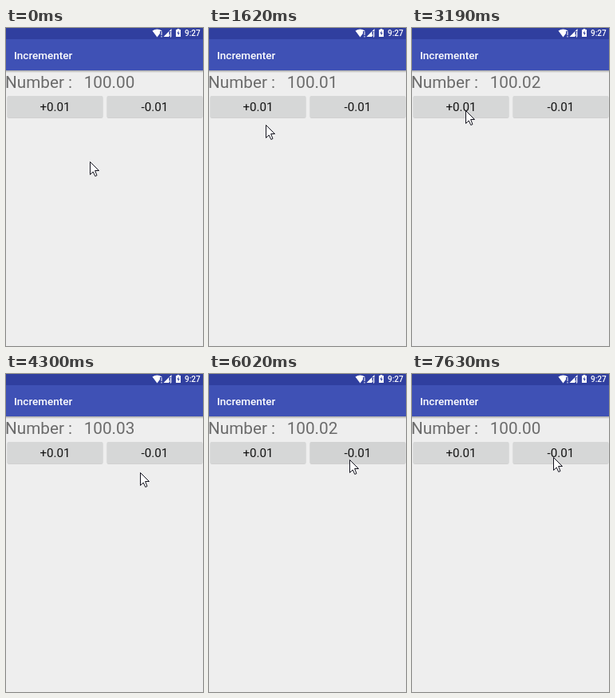
An HTML page that plays this animation: 247 px wide and 398 px high, repeating every 8000 ms.

```html
<!DOCTYPE html>
<html lang="en">
<head>
<meta charset="utf-8">
<title>Counter</title>
<style>
  html, body { margin: 0; width: 100%; height: 100%; overflow: hidden; background: #eee; }
  svg { display: block; width: 247px; height: 398px; font-family: Roboto, sans-serif; }
</style>
</head>
<body>
<svg viewBox="0 0 247 398">
  <defs>
    <linearGradient id="drop" x2="0" y2="1">
      <stop stop-color="#000" stop-opacity=".3"/>
      <stop offset="1" stop-color="#000" stop-opacity="0"/>
    </linearGradient>
    <g id="button">
      <rect y="1" width="120" height="27" rx="2" fill="#000" opacity=".12"/>
      <rect width="120" height="27" rx="1.5"/>
    </g>
  </defs>
  <rect width="247" height="398" fill="#eee"/>
  <rect y="53" width="247" height="3" fill="url(#drop)"/>
  <rect width="247" height="53" fill="#3f51b5"/>
  <rect width="247" height="14" fill="#303f9f"/>

  <g fill="#fff">
    <path d="M183.500 3.500Q189.500 -.5 195.500 3.500L189.500 11.500Z"/>
    <path d="M197.500 11L207.500 1V11Z"/>
    <path d="M194.500 4V9M194.500 10V11.500M206 4V8.500M206 9.500V11.500" stroke="#303f9f" stroke-width="3"/>
    <path d="M195 4.500V9M195 10V11.500M206.500 4.500V8.500M206.500 9.500V11.500" stroke="#fff"/>
    <path d="M213 2H214.700V1H217.300V2H219V11H213Z"/>
    <path d="M216.600 3.200L214.400 6.800H215.800V9.500L217.700 6H216.400Z" fill="#303f9f"/>
    <text x="224" y="10" font-size="10" font-weight="500">9:27</text>
    <text x="10" y="38.700" font-size="13.500" font-weight="500">Incrementer</text>
  </g>

  <g font-size="20.700" fill="#6b6b6b">
    <text x="-1" y="75.200">Number :</text>
    <text id="number" x="97.700" y="75.200">100.00</text>
  </g>

  <use id="plus" href="#button" x="1.500" y="85"/>
  <use id="minus" href="#button" x="126.500" y="85"/>
  <g font-size="15.200" fill="#141414" text-anchor="middle">
    <text x="61.500" y="104">+0.01</text>
    <text x="186.500" y="104">-0.01</text>
  </g>

  <path id="cursor" d="M.5 .5V16.500L4.200 13L6.800 18.500L9 17.500L6.600 11.500H11.500Z"
        fill="#fff" stroke="#14141f" stroke-linejoin="round"/>
</svg>
<script>
const LOOP = 8000, STEP = 75;
const byId = id => document.getElementById(id);

// Each click may be followed by a dip away from the button and a return to (x, y) at time "back"
const clicks = [
  { sign: 1, at: 1190, back: 1960, x: 70, y: 105 },
  { sign: 1, at: 2500, back: 3190, x: 67, y: 103 },
  { sign: 1, at: 3660 },
  { sign: -1, at: 4920, back: 5720, x: 176, y: 107 },
  { sign: -1, at: 6100, back: 6790, x: 176, y: 100 },
  { sign: -1, at: 7170, back: 7630, x: 177, y: 104 }
];

const legs = [];
const travel = (start, end, x, y) => legs.push({ start, end, x, y });

function dip({ sign, at, back, x, y }) {
  if (sign > 0) {
    travel(back - 450, back - 340, x + 1, y + 16);
    travel(back - 140, back, x, y);
  } else {
    const low = at + 150;
    travel(at + 80, low, x, y + 32);
    travel(back - (back - low) * 0.6, back, x, y);
  }
}

travel(70, 340, 74, 97);
travel(490, 580, 73, 104);
clicks.filter(c => c.back && c.sign > 0).forEach(dip);
travel(3820, 3980, 102, 167);
travel(4060, 4300, 168, 123);
travel(4390, 4610, 174, 105);
clicks.filter(c => c.back && c.sign < 0).forEach(dip);

// The pointer advances in even hops, the first one at the start of a leg
function pointerAt(t) {
  let px = 105, py = 167;
  for (const { start, end, x, y } of legs) {
    if (t < start) break;
    const hops = Math.round((end - start) / STEP);
    const progress = Math.min(1, (t - start) / (end - start));
    const done = (Math.floor(progress * hops + 1e-6) + 1) / (hops + 1);
    px += (x - px) * done;
    py += (y - py) * done;
  }
  return [Math.round(px), Math.round(py)];
}

function draw(t) {
  const total = clicks.reduce((sum, c) => sum + (t >= c.at ? c.sign : 0), 0);
  const pressed = sign => clicks.some(c => c.sign === sign && t >= c.at - 80 && t < c.at + 100);
  const shade = sign => pressed(sign) ? "#d2d3d3" : "#d6d7d7";
  byId("number").textContent = (100 + total / 100).toFixed(2);
  byId("plus").setAttribute("fill", shade(1));
  byId("minus").setAttribute("fill", shade(-1));
  byId("cursor").setAttribute("transform", `translate(${pointerAt(t)})`);
}

const begin = performance.now();
function tick() {
  draw((performance.now() - begin) % LOOP);
  requestAnimationFrame(tick);
}
tick();
</script>
</body>
</html>
```
